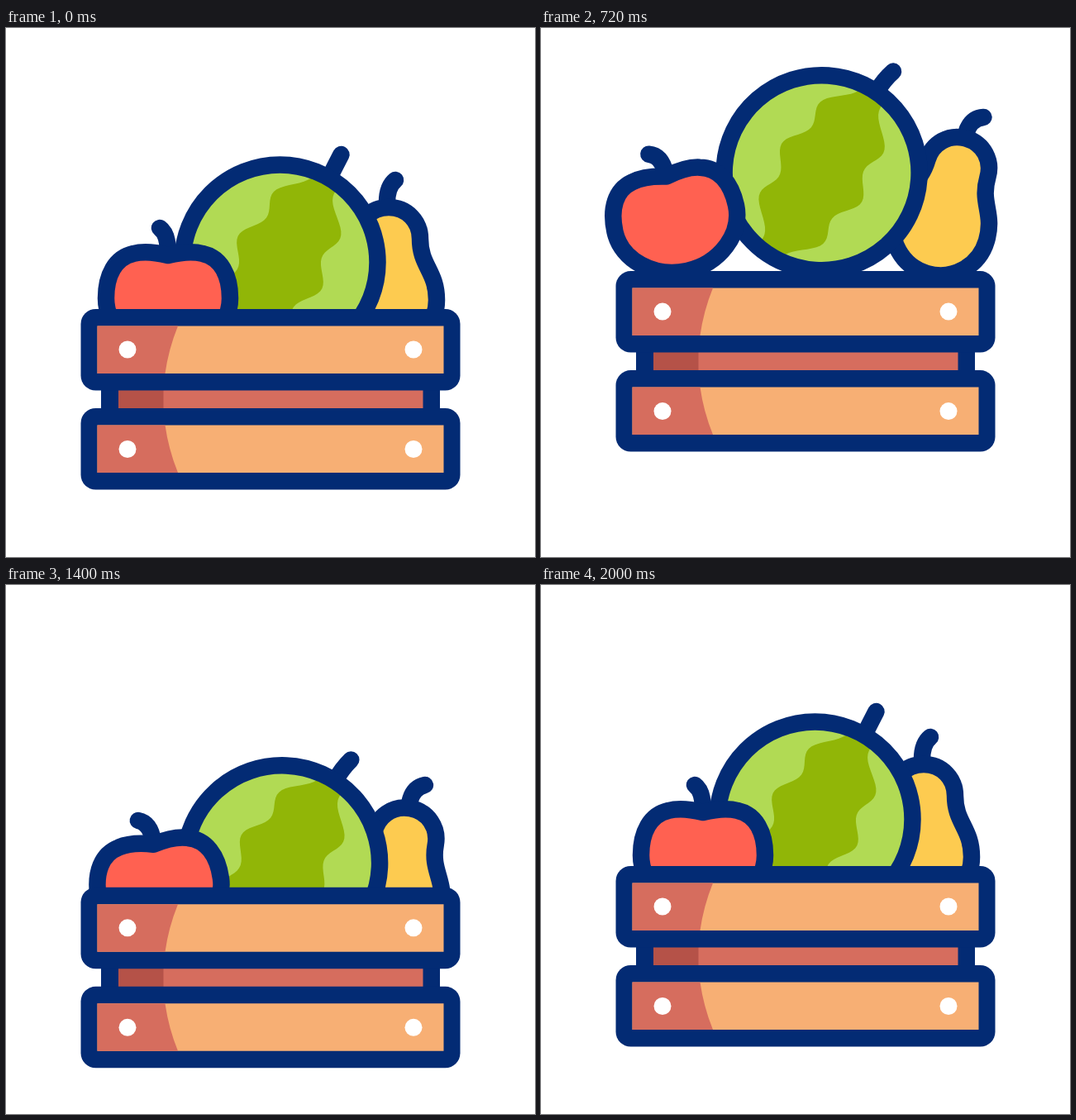
Animation, 640 px wide and 640 px high, one loop 2200 ms. Source, as an HTML page:

```html
<!DOCTYPE html>
<html lang="en">
<head>
<meta charset="utf-8">
<title>Fruit crate</title>
<style>
  html, body { margin: 0; height: 100%; overflow: hidden; background: #fff; }
  svg { display: block; width: 100vw; height: 100vh; }
  .line { stroke: #032b74; stroke-width: 20.5; stroke-linecap: round; stroke-linejoin: round; }
  .navy { fill: #032b74; }
  .shade { fill: #d66d5e; }
</style>
</head>
<body>
<svg viewBox="0 0 640 640">
  <clipPath id="rind"><circle r="118"/></clipPath>
  <g id="pear">
    <path class="line stem" fill="none"/>
    <path class="line body" fill="#fdcb50"/>
  </g>
  <g id="melon">
    <path class="line stem" fill="none"/>
    <circle r="118" fill="#b1da54"/>
    <path id="stripe" fill="#91b607" clip-path="url(#rind)"/>
    <circle class="line" r="118" fill="none"/>
  </g>
  <g id="apple">
    <path class="line stem" fill="none"/>
    <path class="line body" fill="#ff6151"/>
  </g>
  <g id="crate">
    <path class="navy" d="M115 425H525V475H115Z"/>
    <path class="shade" d="M136 438H504.500V461H136Z"/>
    <path fill="#b55248" d="M136 438H190.500V461H136Z"/>
    <g id="slat">
      <rect class="navy" x="90.500" y="340" width="459" height="98.500" rx="18"/>
      <path fill="#f7af74" d="M110.500 360.500H529.500V418H110.500Z"/>
      <path class="shade" d="M110.500 360.500H208Q196.500 389 192.500 418H110.500Z"/>
      <g fill="#fff"><circle cx="147" cy="389" r="10.500"/><circle cx="493" cy="389" r="10.500"/></g>
    </g>
    <use href="#slat" transform="translate(0 898.500) scale(1 -1)"/>
  </g>
</svg>
<script>
const LOOP = 2200, START = 200, CROUCH = 367, APEX = 1040, REBOUND = 1600, SETTLE = 1860, REST = 2000;
const STEM_LAG = 60;
const $ = id => document.getElementById(id);

// Closed outline from the curve points of its right half
function mirrored(half) {
  const left = half.slice(0, -1).reverse().map(([x, y]) => [-x, y]);
  return `M${half[0]}C${half.slice(1).join(' ')} ${left.join(' ')}Z`;
}

// Tilted wavy band; the second edge is the first one turned by 180 degrees
function stripe() {
  const edge = [];
  for (let u = -112; u <= 112; u += 4) {
    const q = 52 - u * u / 400 + 8 * Math.cos((u + 5) * Math.PI / 34);
    edge.push([-.47 * u - .88 * q, .88 * u - .47 * q]);
  }
  return `M${edge.join('L')}L${edge.map(([x, y]) => [-x, -y]).join('L')}Z`;
}

// Cubic easing with flat ends; x1 and x2 set how long it lingers at each end
function ease(u, x1 = 1 / 3, x2 = 2 / 3) {
  let lo = 0, hi = 1, s;
  for (let i = 0; i < 24; i++) {
    s = (lo + hi) / 2;
    const x = 3 * (1 - s) ** 2 * s * x1 + 3 * (1 - s) * s * s * x2 + s ** 3;
    if (x < u) lo = s; else hi = s;
  }
  return s * s * (3 - 2 * s);
}

function track(t, land, values, rise) {
  if (t <= START || t >= REST) return 0;
  const times = [START, CROUCH, APEX, land, REBOUND, SETTLE, REST];
  const v = [0, ...values, 0];
  const i = times.findIndex(end => t < end) - 1;
  const u = (t - times[i]) / (times[i + 1] - times[i]);
  return v[i] + (v[i + 1] - v[i]) * ease(u, ...(times[i] === CROUCH ? rise : []));
}

const hop = (t, p, rise = [.33, .215]) =>
  track(t, p.land, [p.crouch, p.jump, p.crouch, p.rebound, 1.5], rise);

// Swings out to the peak, then keeps only a share of it at each bounce
const sway = (t, p, peak, keep, rise) =>
  track(t, p.land, [0, peak, peak * keep, peak * keep ** 2, 0], rise);

const crate = { land: 1320, crouch: 38.5, jump: -60, rebound: -24 };
const fruits = [
  { id: 'pear', x: 463, y: 329, land: 1333, crouch: 69, jump: -124, rebound: -40,
    shift: 25, turn: 25, bend: 22, base: [-2, -118], ctrl: [-2, -137], tip: [8, -145],
    half: [[0, -112], [22, -112], [38, -95], [38, -74], [38, -41], [58, -35], [58, 0], [58, 32], [32, 58], [0, 58]] },
  { id: 'melon', x: 331.5, y: 283.5, land: 1352, crouch: 63, jump: -148, rebound: -37,
    shift: 10, turn: 6, bend: 17, base: [60, -103], ctrl: [67, -117], tip: [74, -130.5] },
  { id: 'apple', x: 196, y: 327, land: 1340, crouch: 52, jump: -131, rebound: -47,
    shift: -41, turn: -19, bend: -20, base: [0, -55], ctrl: [0, -78], tip: [-10, -85],
    half: [[0, -52], [12, -55], [28, -58], [42, -54], [64, -49], [75, -28], [75, 0], [75, 36], [40, 65], [0, 65]] }
];

function rotate([x, y], [cx, cy], degrees) {
  const a = degrees * Math.PI / 180, c = Math.cos(a), s = Math.sin(a);
  return [cx + (x - cx) * c - (y - cy) * s, cy + (x - cx) * s + (y - cy) * c];
}

function drawFruit(f, t) {
  const x = f.x + sway(t, f, f.shift, .28, [.33, .215]);
  const y = f.y + hop(t, f);
  const turn = sway(t, f, f.turn, .45, [.33, .5]);
  const bend = sway(t - STEM_LAG, f, f.bend, .45, [.33, .5]);
  const el = $(f.id);
  el.setAttribute('transform', `translate(${x} ${y}) rotate(${turn})`);
  el.querySelector('.stem').setAttribute('d', `M${f.base}Q${f.ctrl} ${rotate(f.tip, f.base, bend)}`);
}

function draw(t) {
  fruits.forEach(f => drawFruit(f, t));
  $('crate').setAttribute('transform', `translate(0 ${hop(t, crate, [.2, .14])})`);
}

$('stripe').setAttribute('d', stripe());
for (const f of fruits) {
  if (f.half) $(f.id).querySelector('.body').setAttribute('d', mirrored(f.half));
}

const start = performance.now();
(function frame() {
  draw((performance.now() - start) % LOOP);
  requestAnimationFrame(frame);
})();
</script>
</body>
</html>
```
